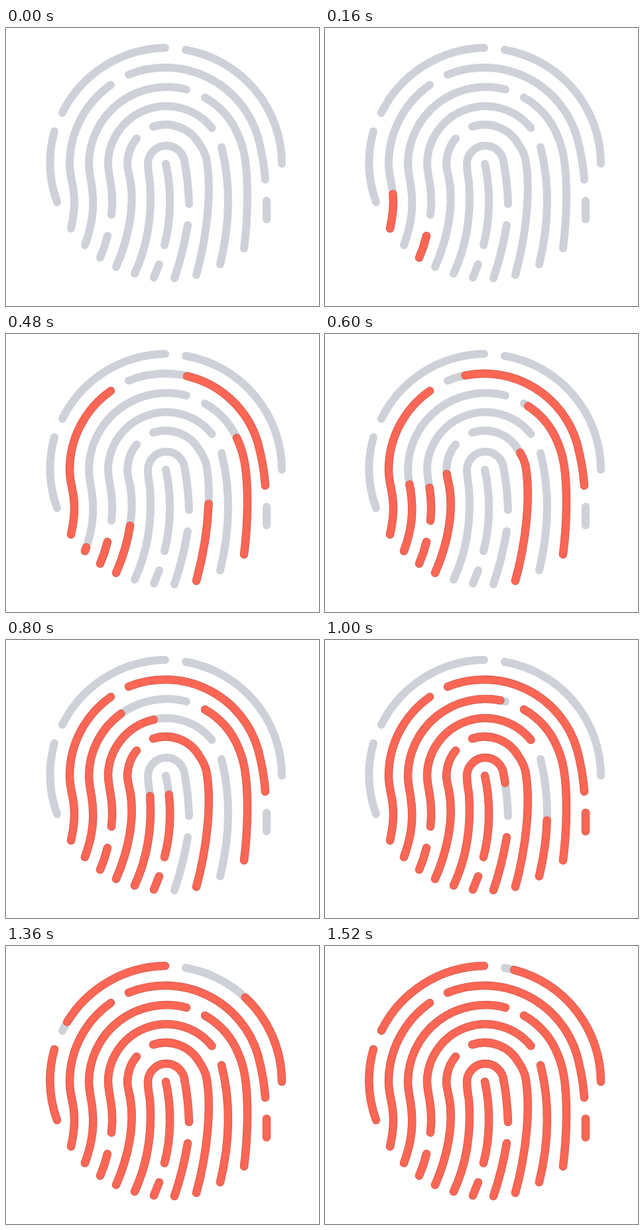
An HTML page for the animation above (2520 ms loop, 472 by 420 pixels).

```html
<!DOCTYPE html>
<html lang="en">
<head>
<meta charset="utf-8">
<title>Fingerprint scan</title>
<style>
  html, body { margin: 0; width: 100%; height: 100%; overflow: hidden; background: #fff; }
  svg { display: block; width: 472px; height: 420px; }
  path { fill: none; stroke-linecap: round; stroke-linejoin: round; }
  .base { stroke: #ced1d8; stroke-width: 12; }
  .rim { stroke: #cb5d50; stroke-width: 12.5; }
  .ink { stroke: #fd6654; stroke-width: 10.9; }
</style>
</head>
<body>
<svg viewBox="0 0 472 420">
  <g id="bases"></g>
  <g id="inks"></g>
</svg>
<script>
const LOOP = 2520, STEP = 40, LAST = 1520;

// Each ridge: start time, fill duration, path from the end that fills first
const ridges = [
  [30, 54, 'M142 347Q149 331 153 314'],
  [100, 363, 'M98 303C105 272 104 252 99 230Q96 215 96 205A146 146 0 0 1 158 86'],
  [182, 485, 'M391 229Q389 199 380 165A146 146 0 0 0 185 70.5'],
  [256, 362, 'M359 333C365 285 366 230 360 195Q357 178 351 164A117 117 0 0 0 300 105'],
  [335, 440, 'M287 373C303 315 311 245 302 197Q299 186 292 176A59 59 0 0 0 222 149'],
  [390, 312, 'M166 361C184 320 195 270 187 228Q183 211 183 205Q184 182 197 167'],
  [473, 548, 'M119 328C131 295 134 268 129 236Q125 215 125 205A117 117 0 0 1 272 93'],
  [543, 453, 'M159 282C162 258 159 240 156 223Q154 212 154 203A88 88 0 0 1 310.5 151'],
  [636, 473, 'M194 371C213 330 221 285 217 232Q214 216 214 204A27.8 27.8 0 0 1 269.5 204Q275 232 276 266'],
  [671, 190, 'M239 328C249 290 250 245 241 205'],
  [745, 32, 'M223 377L231 357'],
  [816, 128, 'M254 378Q267 340 274 298'],
  [890, 44, 'M393 289V261'],
  [895, 274, 'M323 357C338 295 339 235 325 180'],
  [1029, 166, 'M77 263A176 176 0 0 1 73 156'],
  [1109, 286, 'M240 30A176 176 0 0 0 85 128'],
  [1176, 380, 'M416 205A175 175 0 0 0 271 33']
];

function add(parent, tag, attrs = {}) {
  const node = document.createElementNS('http://www.w3.org/2000/svg', tag);
  for (const name in attrs) node.setAttribute(name, attrs[name]);
  return parent.appendChild(node);
}

const bases = document.getElementById('bases');
const inks = document.getElementById('inks');

const strokes = ridges.map(([start, span, d]) => {
  const base = add(bases, 'path', { class: 'base', d });
  const group = add(inks, 'g');
  add(group, 'path', { class: 'rim', d });
  add(group, 'path', { class: 'ink', d });
  return { start, span, group, length: base.getTotalLength() };
});

const ease = x => x * (1.4 - 0.4 * x);

function draw(ms) {
  const t = Math.min(Math.floor(ms / STEP) * STEP, LAST);
  for (const { start, span, group, length } of strokes) {
    const x = Math.max(0, Math.min(1, (t - start) / span));
    group.style.display = x > 0 ? '' : 'none';
    // Both layers of the stroke inherit the dash
    group.setAttribute('stroke-dasharray',
      x < 1 ? `${ease(x) * length} ${length * 2}` : 'none');
  }
}

const begin = performance.now();
function tick() {
  draw((performance.now() - begin) % LOOP);
  requestAnimationFrame(tick);
}
tick();
</script>
</body>
</html>
```
